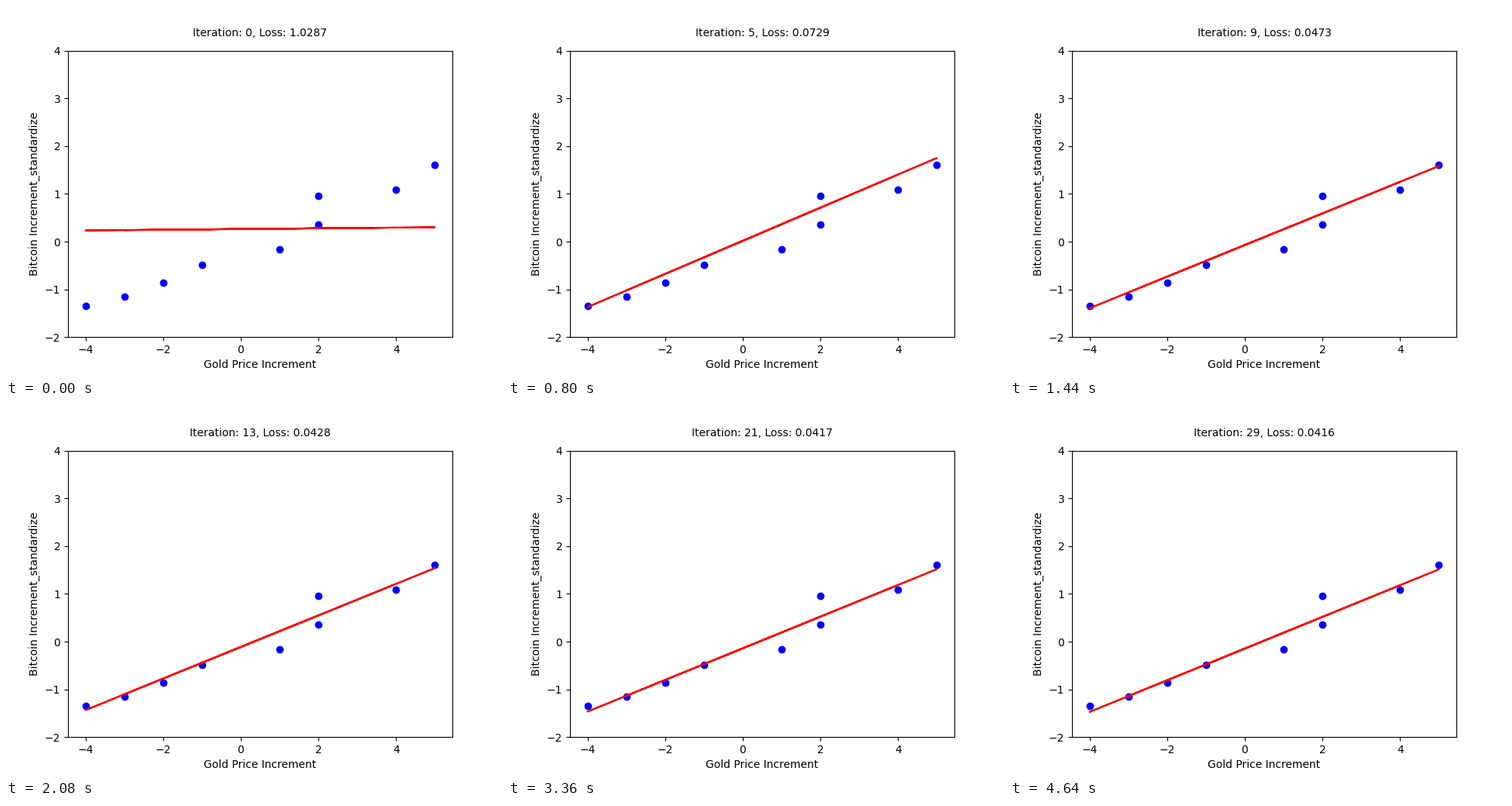
A matplotlib script for the animation above (4800 ms loop, 640 px wide and 480 px high).

```python
import numpy as np
import matplotlib.pyplot as plt
from matplotlib.animation import FuncAnimation

STEPS = 30
INTERVAL = 160
RATE = 0.09

# Unsorted samples: the fitted line runs back and forth over itself.
gold = np.array([2, -1, 4, -3, 5, 1, -4, -2, 2], dtype=float)
coin = np.array([22, -30, 67, -71, 99, -9.83, -83, -53, 58.83])
coin = (coin - coin.mean()) / coin.std()


def descend(w, b):
    """Return (slope, intercept, mean squared error) for each iteration."""
    history = []
    for _ in range(STEPS):
        error = w * gold + b - coin
        history.append((w, b, np.mean(error ** 2)))
        w -= RATE * 2 * np.mean(error * gold)
        b -= RATE * 2 * np.mean(error)
    return history


history = descend(0.00747, 0.26377)

fig, ax = plt.subplots(figsize=(6.4, 4.8), dpi=100)
ax.scatter(gold, coin, color="blue")
line, = ax.plot(gold, history[0][0] * gold + history[0][1], color="red")
ax.set_xlim(-4.45, 5.45)
ax.set_ylim(-2, 4)
ax.set_xlabel("Gold Price Increment")
ax.set_ylabel("Bitcoin Increment_standardize")
title = ax.text(0.5, 1.05, "", transform=ax.transAxes, ha="center")


def update(i):
    w, b, loss = history[i]
    line.set_ydata(w * gold + b)
    title.set_text(f"Iteration: {i}, Loss: {loss:.4f}")
    return line, title


anim = FuncAnimation(fig, update, frames=STEPS, interval=INTERVAL,
                     repeat=True, repeat_delay=0)
plt.show()
```
